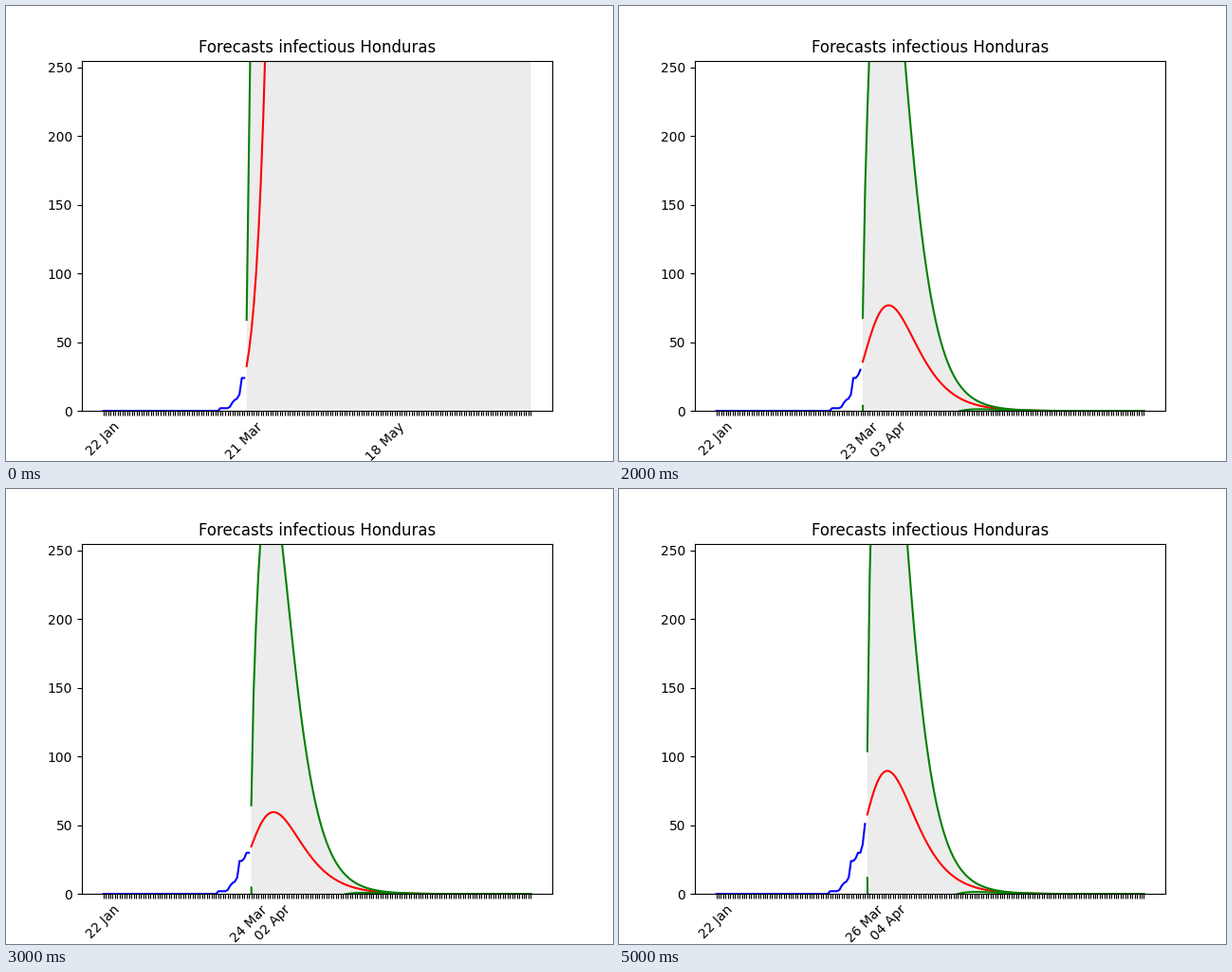
Recreate the animation shown at these times as a matplotlib script. Size 640 by 480 pixels, loop 6000 ms.

```python
import numpy as np
import matplotlib.pyplot as plt
from matplotlib.animation import FuncAnimation

HORIZON = 120     # forecast days
FIRST_OBS = 60    # observed days in the first forecast
RECOVERY = 0.111  # daily recovery rate
MONTHS = [("Jan", 31), ("Feb", 29), ("Mar", 31), ("Apr", 30), ("May", 31)]

observed = np.array([0] * 49 + [2, 2, 2, 2, 3, 6, 8, 9, 12, 24, 24,
                                26, 30, 30, 36, 51])

# one value per forecast
PEAK_DAY = [118, 73.6, 72.95, 72.45, 72.75, 73.6]
SPREAD = [1.03, 1.03, 0.89, 0.86, 0.756, 0.793]
DAMPING = [0.0226] + [0.083] * 5

fig, ax = plt.subplots(figsize=(6.4, 4.8), dpi=100)


def date_label(day):
    """Date that lies the given number of days after 22 Jan."""
    day += 22
    for name, length in MONTHS:
        if day <= length:
            return f"{day:02d} {name}"
        day -= length


def log_curve(days, peak_day, damping):
    """Log of the infectious count relative to its peak."""
    u = days - peak_day
    return RECOVERY * ((1 - np.exp(-damping * u)) / damping - u)


def band_shape(t, damping):
    """Relative band width: quick rise from 1, then slow decay."""
    rise = np.sqrt(1 - 0.984 * np.exp(-0.185 * t))
    return 7.95 * rise * np.exp(-0.57 * damping * t)


def forecast(i, days):
    """Mean and half band width, continuing from the last observation."""
    last = days[0] - 1
    shape = PEAK_DAY[i], DAMPING[i]
    growth = log_curve(days, *shape) - log_curve(last, *shape)
    mean = observed[last] * np.exp(growth)
    return mean, mean * SPREAD[i] * band_shape(days - days[0], DAMPING[i])


def draw(i):
    ax.clear()
    n_obs = FIRST_OBS + i
    total = n_obs + HORIZON
    days = np.arange(n_obs, total)
    mean, half = forecast(i, days)

    ax.plot(np.arange(n_obs), observed[:n_obs], "b")
    ax.plot(days, mean, "r")
    ax.plot(days, mean + half, "g")
    ax.plot(days, mean - half, "g")
    ax.fill_between(days, mean - half, mean + half,
                    facecolor="k", alpha=0.075, linewidth=0)

    labels = [""] * total
    top = round(PEAK_DAY[i])
    for tick, day in [(0, 0), (n_obs - 1, n_obs - 1), (top, top - 1)]:
        labels[tick] = date_label(day)
    ax.set_xticks(range(total), labels, rotation=45)

    margin = 0.05 * (total - 1)
    ax.set_xlim(-margin, total - 1 + margin)
    ax.set_ylim(0, 5 * observed.max())
    ax.set_title("Forecasts infectious Honduras")
    return []


anim = FuncAnimation(fig, draw, frames=len(PEAK_DAY), interval=1000,
                     init_func=lambda: draw(0), repeat=True, repeat_delay=0)
plt.show()
```
